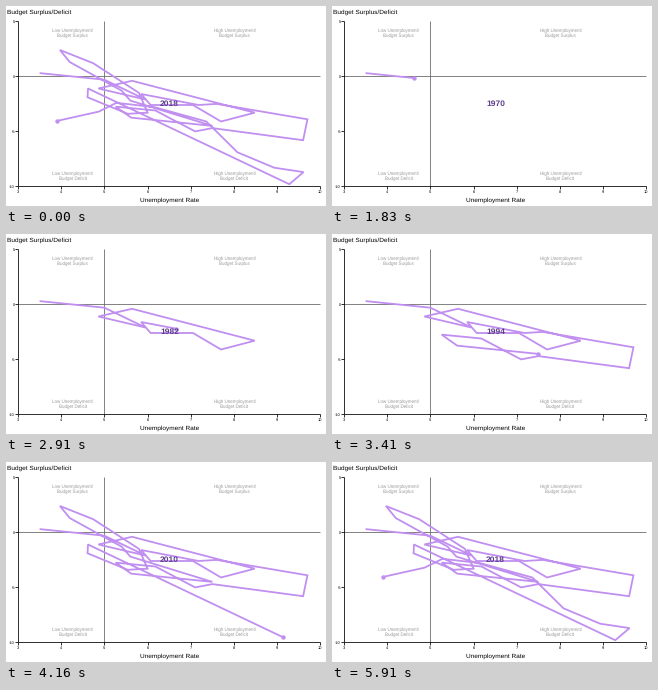
Recreate the animation shown at these times as a matplotlib script. Size 320x200 px, loop 6.01 s.

```python
import numpy as np
import matplotlib.pyplot as plt
from matplotlib.animation import FuncAnimation

W, H, DPI = 320, 200, 100
PT = 72 / DPI
FIRST_YEAR, LAST_YEAR = 1969, 2018
HOLD, DURATION = 888, 5000      # ms at rest, ms of drawing
LINE, LABEL = "#c08ff0", "#5f3f8c"
GREY, DIVIDER = "#999999", "#666666"

plt.rcParams["font.family"] = "Liberation Sans"
plt.rcParams["text.hinting"] = "none"

# Turning points of the trail: unemployment rate, budget balance
TURNS = [
    (3.5, 0.3), (5, -0.3), (5.95, -2.1), (4.86, -1.1), (5.64, -0.4),
    (8.48, -3.3), (7.7, -4.1), (7.05, -2.6), (6.07, -2.6), (5.85, -1.6),
    (7.18, -2.6), (7.6, -2.5), (9.7, -3.9), (9.6, -5.8), (7.5, -4.7),
    (7.1, -5), (6.18, -3.1), (5.26, -2.75), (5.62, -3.75), (7.5, -4.5),
    (5.6, -2.2), (5.4, -1.3), (4.2, 1.3), (3.97, 2.4), (4.74, 1.2),
    (5.8, -1.5), (6, -3.3), (5.54, -3.4), (4.61, -1.9), (4.62, -1.1),
    (9.28, -9.8), (9.61, -8.7), (8.93, -8.3), (8.08, -6.9), (7.36, -4.1),
    (6.16, -2.8), (5.28, -2.4), (4.87, -3.2), (3.9, -4.05)]


def px(v):
    return 12 + (v - 3) * 43.2


def py(v):
    return 70.4 - v * 11


rate, budget = np.array(TURNS).T
xs, ys = px(rate), py(budget)
dist = np.concatenate([[0], np.cumsum(np.hypot(np.diff(xs), np.diff(ys)))])

fig = plt.figure(figsize=(W / DPI, H / DPI), dpi=DPI, facecolor="white")
ax = fig.add_axes([0, 0, 1, 1])
ax.set_xlim(0, W)
ax.set_ylim(H, 0)
ax.axis("off")


def rule(x, y, color="black"):
    ax.plot(x, y, color=color, lw=0.8 * PT, solid_capstyle="butt")


def write(x, y, text, size, color="black", ha="center", **kw):
    return ax.text(x, y, text, fontsize=size * PT, color=color, ha=ha,
                   va="baseline", **kw)


# Axes, ticks and the two dividing lines
left, right, top, bottom = px(3), px(10), py(5), py(-10)
rule([left, right], [py(0), py(0)], DIVIDER)
rule([px(5), px(5)], [top, bottom], DIVIDER)
rule([left, left], [top, bottom])
rule([left, right], [bottom, bottom])
for v in range(3, 11):
    rule([px(v), px(v)], [bottom, bottom + 2.4])
    write(px(v), 187.2, str(v), 4)
for v in range(5, -11, -5):
    rule([left - 2.6, left], [py(v), py(v)])
    write(9, py(v) + 1.4, str(v), 4, ha="right")

write(0.8, 7.4, "Budget Surplus/Deficit", 6.45, ha="left")
write(163.5, 196.2, "Unemployment Rate", 6.45)
for x, level in ((66.8, "Low"), (228.5, "High")):
    for y, state in ((26.4, "Surplus"), (169.2, "Deficit")):
        write(x, y, f"{level} Unemployment/", 4.55, GREY)
        write(x, y + 4.5, f"Budget {state}", 4.55, GREY)

trail, = ax.plot([], [], color=LINE, lw=1.8 * PT, solid_joinstyle="miter",
                 solid_capstyle="butt", zorder=3)
dot, = ax.plot([], [], "o", color=LINE, ms=4.4 * PT, mew=0, zorder=4)
year = write(163.5, 100.3, "", 8.5, LABEL, weight="bold", zorder=5)


def ease(u):
    return 4 * u ** 3 if u < 0.5 else 1 - 4 * (1 - u) ** 3


def draw(i):
    # The picture advances twelve times a second on a 10 ms clock
    step = min((3 * (i + 1) - 1) // 25, 71)
    t = step * 1000 / 12
    u = 1 if t < HOLD else min((t - HOLD) / DURATION, 1)
    e = ease(u)
    reach = e * dist[-1]
    tip = np.interp(reach, dist, xs), np.interp(reach, dist, ys)
    n = np.searchsorted(dist, reach)
    trail.set_data(np.append(xs[:n], tip[0]), np.append(ys[:n], tip[1]))
    dot.set_data([tip[0]], [tip[1]])
    year.set_text(str(FIRST_YEAR + round(e * (LAST_YEAR - FIRST_YEAR))))
    return trail, dot, year


anim = FuncAnimation(fig, draw, frames=601, interval=10,
                     init_func=lambda: draw(0), repeat=True, repeat_delay=0)
plt.show()
```
